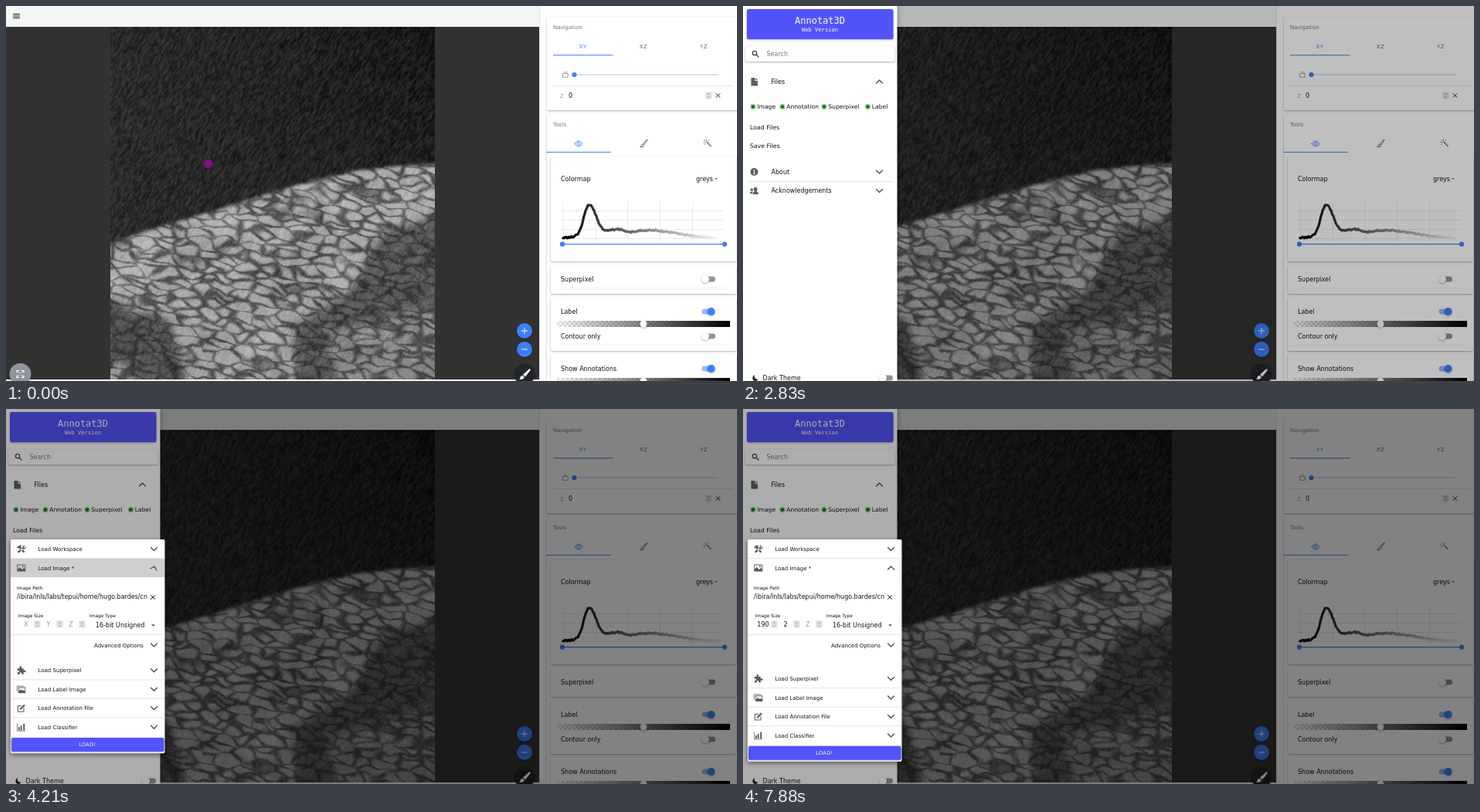
An HTML page with a canvas that plays this animation: 946x486 px, repeating every 8 s.

```html
<!DOCTYPE html>
<html lang="en">
<head>
<meta charset="utf-8">
<title>Annotat3D</title>
<style>
html, body { margin: 0; width: 100%; height: 100%; overflow: hidden; background: #323231; }
canvas { position: absolute; left: 135px; top: 27px; }
svg { position: absolute; left: 0; top: 0; }
text { font-family: 'DejaVu Sans', sans-serif; white-space: pre; }
.mono { font-family: 'DejaVu Sans Mono', monospace; }
.shadow { filter: drop-shadow(0 1px 1.2px rgba(0,0,0,.32)); }
.line { fill: none; stroke: currentColor; stroke-linecap: round; stroke-linejoin: round; }
</style>
</head>
<body>
<canvas id="scan" width="420" height="458"></canvas>
<svg id="ui" width="946" height="486" viewBox="0 0 946 486"></svg>
<script>
const $ = id => document.getElementById(id);
const BLUE = '#3d7ff8', INDIGO = '#5254fa';

// ---- seeded randomness
const hash = (x, y) => {
  let h = Math.imul(x, 374761393) + Math.imul(y, 668265263) | 0;
  h = Math.imul(h ^ h >>> 13, 1274126177);
  return ((h ^ h >>> 16) >>> 0) / 2 ** 32;
};
const mix = (a, b, k) => a + (b - a) * k;
const clamp = v => Math.min(1, Math.max(0, v));

// ---- drawing helpers
const text = (x, y, s, size = 8, fill = '#111', more = '') =>
  `<text x="${x}" y="${y + size * .36}" font-size="${size}" fill="${fill}" ${more}>${s}</text>`;
const mid = 'text-anchor="middle"';
const rect = (x, y, w, h, fill, more = '') =>
  `<rect x="${x}" y="${y}" width="${w}" height="${h}" fill="${fill}" ${more}/>`;
const dot = (x, y, r, fill, more = '') => `<circle cx="${x}" cy="${y}" r="${r}" fill="${fill}" ${more}/>`;
const rule = (x, y, w, c = '#dedede') => rect(x, y, w, .8, c);
const path = (x, y, d, color = '#222', width = 1) =>
  `<path class="line" transform="translate(${x} ${y})" d="${d}" color="${color}" stroke-width="${width}"/>`;
const solid = (x, y, d, color = '#55595f') => `<path transform="translate(${x} ${y})" d="${d}" fill="${color}" fill-rule="evenodd"/>`;
const card = (x, y, w, h) => rect(x, y, w, h, '#fff', 'rx="2" class="shadow"');
const chevron = (x, y, id = '') => `<g transform="translate(${x} ${y})"><path ${id && `id="${id}"`} class="line"
  d="M-4-2L0 2L4-2" color="#444" stroke-width="1.2"/></g>`;
const cross = (x, y) => path(x, y, 'M-2.5-2.5L2.5 2.5M2.5-2.5L-2.5 2.5', '#222', 1);
const spinner = (x, y) => rect(x - 4, y - 4.5, 8.5, 9, '#e4e4e4', 'rx="1"') +
  path(x, y, 'M-1.5-1.3L.2-2.8L1.9-1.3M-1.5 1.3L.2 2.8L1.9 1.3', '#777', .7);
const toggle = (x, y, on) => on
  ? rect(x - 12, y - 3.5, 16, 7, '#94b9fb', 'rx="3.5"') + dot(x, y, 5, BLUE, 'class="shadow"')
  : rect(x - 3, y - 3.5, 16, 7, '#949494', 'rx="3.5"') + dot(x, y, 5, '#fff', 'class="shadow"');
const fab = (x, y, r, fill) => dot(x, y, r, fill, 'class="shadow"');
const alphaBar = y => rect(713, y - 4, 224, 8, 'url(#checker)') + rect(713, y - 4, 224, 8, 'url(#fade)') +
  dot(825, y, 4.5, '#fff', 'class="shadow"');

// ---- icons of the menu and the dialog
const icons = {
  doc: 'M-4-5H1V-1H4.500V5.500H-4ZM2-5L4.500-2H2Z',
  info: 'M-5 0A5 5 0 1 1 5 0A5 5 0 1 1-5 0ZM-.7-3H.7V-1.600H-.7ZM-1-.7H.7V2.400H1.200V3.200H-1.200V2.400H-.6V0H-1Z',
  people: 'M-.5-2A2.300 2.300 0 1 1 4-2A2.300 2.300 0 1 1-.5-2ZM-2 4.500Q-2 .8 1.800 .8T5.500 4.500ZM-5-1.500A1.800 1.800 0 1 1-1.400-1.500A1.800 1.800 0 1 1-5-1.500ZM-5.500 3.800Q-5.500 .9-3 .9L-1.500 1.300Q-2.700 2.300-2.800 3.800Z',
  tools: 'M-5.500-2L-2.500-5L1-4.500L-1-3.500L0-2L4.500 3.500L3 5L-2.500-.5L-3.500-1.500L-4.300-.8ZM5-5L3-3V-2L4-1.500L5.800-3.500Q6 0 3 0L-3.500 5L-5 3.500L1.500-2Q1.500-5 5-5Z',
  image: 'M-5.500-4.500H5.500V4.500H-5.500ZM-4.500-3.500V1.500L-2-1L1 2L3 0L4.500 1.500V-3.500ZM1.200-1.800A1 1 0 1 1 3.200-1.800A1 1 0 1 1 1.200-1.800Z',
  puzzle: 'M-5-2.500H-2Q-3-5.500-1-5.500T0-2.500H3V.2Q5.800-.8 5.800 1.200T3 2V5H.5Q1 2.500-.8 2.500T-2 5H-5V2.500Q-2.500 3-2.500 1.200T-5 .2Z',
  images: 'M-5.500-4.500H3.500V-3.700H-4.700V2.500H-5.500ZM-3.700-2.700H5.500V5H-3.700ZM-2.800-1.800V2L-.5 0L1.500 2L3 1L4.600 2.500V-1.800Z',
  edit: 'M-5-3.500H1L0-2.500H-4V4H2.700V0L3.700-1V5H-5ZM3.500-5L5-3.500L0 1.800L-2 2.300L-1.500 .3Z',
  chart: 'M-5.500-4.500H-4.700V4.500H5.500V5.300H-5.500ZM-3.700 0H-1.900V4H-3.700ZM-1-2H.8V4H-1ZM2.500-4.500H4.500V4H2.500Z'
};

// ---- histogram: a few knots, sampled with a little jitter
const knots = [[721, 300.5], [735, 299], [740, 296], [745, 285], [750, 265], [753, 258.5], [758, 258.5], [763, 270],
  [768, 284], [773, 290], [779, 291], [792, 289], [808, 293], [820, 291], [840, 290.5], [850, 292], [870, 295],
  [890, 298], [910, 300], [929, 301]];
const curveAt = x => {
  const i = Math.max(1, knots.findIndex(k => k[0] >= x)), [a, b] = [knots[i - 1], knots[i]];
  return mix(a[1], b[1], (x - a[0]) / (b[0] - a[0]));
};
const curve = Array.from({ length: 209 }, (_, i) =>
  `${721 + i},${curveAt(721 + i) + (hash(i, 7) - .5) * 2}`).join(' ');

// ---- viewer and right panel
const base = `
<defs>
  <pattern id="checker" width="6" height="6" x="713" y="2" patternUnits="userSpaceOnUse">
    ${rect(0, 0, 6, 6, '#fff') + rect(0, 0, 3, 3, '#ddd') + rect(3, 3, 3, 3, '#ddd')}</pattern>
  <linearGradient id="fade"><stop stop-opacity="0"/><stop offset="1"/></linearGradient>
  <linearGradient id="greys" gradientUnits="userSpaceOnUse" x1="721" x2="929">
    <stop/><stop offset="1" stop-color="#fff"/></linearGradient>
  <clipPath id="filesClip"><rect id="filesBox" x="0" y="110" width="200"/></clipPath>
  <clipPath id="formClip"><rect id="formBox" x="6" y="218" width="200"/></clipPath>
  <clipPath id="pathClip">${rect(13, 236, 170, 16, '#000')}</clipPath>
</defs>
${dot(0, 0, 5.5, '#860b86', 'id="cursor"')}
${rect(0, 484, 690, 2, '#f4f5f5')}
${rect(0, 0, 690, 27, '#f4f5f5')}
${dot(13.5, 13, 8.5, '#000', 'id="hover" opacity="0"')}
${path(13.5, 13, 'M-4-2.500H4M-4 0H4M-4 2.500H4', '#111', 1.1)}
${fab(18.5, 477, 14, '#92949c')}
${path(18.5, 477, 'M-4.500-2V-4.500H-2M-4.500-4.500L-1.500-1.500M4.500-2V-4.500H2M4.500-4.500L1.500-1.500M-4.500 2V4.500H-2M-4.500 4.500L-1.500 1.500M4.500 2V4.500H2M4.500 4.500L1.500 1.500', '#fff')}
${fab(671, 421, 10, BLUE) + path(671, 421, 'M-3.500 0H3.500M0-3.500V3.500', '#fff')}
${fab(671, 445, 10, BLUE) + path(671, 445, 'M-3.500 0H3.500', '#fff')}
${fab(671, 477, 13.5, '#222428')}
${solid(671, 477, 'M6.500-7L8-5.500L1 3.500L-2 .8ZM-2.700 1.800L0 4.300Q-1.500 8-7 6.500Q-5.500 5.500-5.300 4Q-5 2-2.700 1.800Z', '#fff')}
${rect(690, 0, 256, 486, '#fefefe') + rect(690, 0, .8, 486, '#ddd')}
${card(700, 13.5, 250, 121.5) + text(708, 27, 'Navigation', 7, '#777')}
${[['XY', 746.5, BLUE], ['XZ', 825, '#666'], ['YZ', 903, '#666']].map(([s, x, c]) =>
    text(x, 52.5, s, 7, c, mid + ' letter-spacing=".4"')).join('')}
${rect(708, 63.2, 77.5, 1, BLUE)}
${path(724, 89, 'M-3.200-1.500H3.200V3.300H-3.200ZM-2-3.200H2', '#777', .7)}
${rect(735, 88.5, 187, 1, '#a9c7fb') + dot(735.5, 89, 3.1, BLUE)}
${rule(708, 103, 233) + text(717, 116, 'Z', 7, '#999') + text(728, 116, '0')}
${spinner(909, 116) + cross(921.5, 116)}
${card(700, 139.5, 250, 360) + text(708, 153, 'Tools', 7, '#777')}
${path(741, 178.5, 'M-5 0Q-2.500-3.700 0-3.700T5 0Q2.500 3.700 0 3.700T-5 0ZM-1.900 0A1.900 1.900 0 1 1 1.900 0A1.900 1.900 0 1 1-1.900 0', BLUE, .9)}
${path(825, 178, 'M4.300-4.700L-1 .7L.5 2.200L4.900-4.100ZM-1.400 1.400Q-2.700 1.600-2.900 3.300Q-3.200 4.400-4.500 4.400Q-1.800 5.400-.2 4.300Q.8 3.500 .2 2.700', '#444', .8)}
${path(908, 178, 'M-1.500-1.500L4 4L4.700 3.300L-.8-2.200ZM-1.500-5V-4M-5-1.500H-4M-4.300-4.300L-3.500-3.500M1.500-4.300L1-3.700M-4.300 1.300L-3.500 .7', '#444', .8)}
${rect(699, 188.9, 84, 1, BLUE)}
${card(705, 195, 240, 136) + text(718, 224, 'Colormap') + text(893, 224, 'greys')}
${solid(919, 224, 'M-2-1H2L0 1Z', '#666')}
${[265, 277, 289, 301].map(y => rect(718, y, 211, .6, '#ddd')).join('')}
${[721, 763, 804, 846, 888].map(x => rect(x, 254, .6, 50, '#ddd')).join('')}
<polyline points="${curve}" fill="none" stroke="url(#greys)" stroke-width="3.200" stroke-linejoin="round" stroke-linecap="round"/>
${rect(720, 308, 210, 1.2, BLUE) + dot(720, 308.7, 3.1, BLUE) + dot(930, 308.7, 3.1, BLUE)}
${card(705, 336, 240, 37) + text(718, 354, 'Superpixel') + toggle(905, 354) + rule(718, 365, 214, '#eee')}
${card(705, 378, 240, 69) + text(718, 396, 'Label') + toggle(912.5, 396, 1) + alphaBar(412)}
${text(718, 428, 'Contour only') + toggle(905, 428) + rule(718, 439, 214, '#eee')}
${card(705, 452, 240, 60) + text(718, 470, 'Show Annotations') + toggle(912.5, 470, 1) + alphaBar(486)}
${rect(0, 0, 946, 486, '#000', 'id="menuShade"')}`;

// ---- side menu
const menuItem = (y, icon, label, id) =>
  solid(14.5, y, icons[icon], '#565e6a') + text(36.5, y, label) + chevron(176.5, y, id);

const menu = `<g id="menu">
${rect(0, 0, 199.5, 486, '#fff', 'style="filter:drop-shadow(1px 0 3px rgba(0,0,0,.3))"')}
${rect(5, 4, 189.5, 39, INDIGO, 'rx="2.5" class="shadow"')}
${text(99.5, 18.5, 'Annotat3D', 12, '#fff', mid + ' class="mono"')}
${text(99.5, 30.5, 'Web Version', 7.1, '#fff', mid + ' class="mono"')}
${rect(3, 51.5, 193.5, 20.5, '#fff', 'rx="1.5" class="shadow"')}
${path(16, 62, 'M-3.700-1A2.700 2.700 0 1 1 1.700-1A2.700 2.700 0 1 1-3.700-1M1 1L4 4', '#444', 1.3) + text(30.5, 62, 'Search', 8, '#777')}
${rect(4, 86, 192, 24, '#000', 'id="filesHover"') + menuItem(98, 'doc', 'Files', 'filesChevron')}
<g clip-path="url(#filesClip)">
${rect(33, 145.5, 142.5, 24, '#000', 'id="ripple" rx="4"')}
${[['Image', 13], ['Annotation', 51], ['Superpixel', 105], ['Label', 161.5]].map(([s, x]) =>
    dot(x, 130.5, 3.7, '#a5cfa5') + dot(x, 130.5, 2.3, '#087a16') + text(x + 5.3, 130.5, s, 7.6)).join('')}
${text(9, 157, 'Load Files', 7.8) + text(9, 181.5, 'Save Files', 7.8)}
</g>
<g id="lowerItems">${menuItem(122, 'info', 'About') + rule(7, 134, 188) + menuItem(146.5, 'people', 'Acknowledgements')}</g>
${solid(16, 482, 'M-1-4Q-2.500 1.500 3.700 1.700Q2 4.300-.5 4Q-3.500 3.500-3.700 0Q-3.500-3-1-4Z', '#222')}
${text(25.5, 482, 'Dark Theme') + toggle(181, 482)}
</g>
${rect(0, 0, 946, 486, '#000', 'id="dialogShade"')}`;

// ---- load dialog
const row = (y, icon, label, id) =>
  solid(19.8, y, icons[icon]) + text(41.5, y, label, 7) + chevron(191.5, y, id);
const field = (x, id) => text(x, 279, '', 8, '#111', `id="${id}" ${mid}`) + spinner(x + 14.3, 279);

const dialog = `<g id="dialog">
${rect(6, 169, 199.5, 169, '#fff', 'id="sheet" rx="2" style="filter:drop-shadow(0 2px 3px rgba(0,0,0,.5))"')}
${row(181.5, 'tools', 'Load Workspace') + rule(6, 193.3, 199.5)}
${rect(6, 194, 199.5, 24, '#000', 'id="imageHover"') + row(206, 'image', 'Load Image *', 'imageChevron')}
<g clip-path="url(#formClip)">
${rect(6, 265, 199.5, 28, '#000', 'id="sizeHover"')}
${text(14, 232, 'Image Path', 5.9)}
<g clip-path="url(#pathClip)">${text(14, 243.5, '/ibira/lnls/labs/tepui/home/hugo.bardes/cn')}</g>
${cross(190, 244)}
${text(16, 267.5, 'Image Size', 5.9) + text(108, 267.5, 'Image Type', 5.9)}
${field(26, 'sizeX') + field(55, 'sizeY') + field(84, 'sizeZ')}
${rect(0, 274, .7, 9.5, '#222', 'id="caret"')}
${text(116, 280, '16-bit Unsigned') + solid(190.5, 280.5, 'M-2.500-1.200H2.500L0 1.300Z', '#555')}
${rule(6, 292.3, 199.5) + text(114, 306, 'Advanced Options', 7) + chevron(191.5, 306)}
</g>
<g id="lowerRows">
${[['puzzle', 'Load Superpixel'], ['images', 'Load Label Image'], ['edit', 'Load Annotation File'], ['chart', 'Load Classifier']]
    .map(([icon, s], i) => row(230.5 + i * 24.5, icon, s) + (i < 3 ? rule(6, 242.3 + i * 24.5, 199.5) : '')).join('')}
${rect(7, 317.8, 197.5, 18, INDIGO, 'rx="2" class="shadow"')}
${text(105.4, 326.6, 'LOAD!', 6.5, '#fff', mid + ' letter-spacing=".4"')}
</g></g>`;

$('ui').innerHTML = base + menu + dialog;

// ---- tomography slice
const noise = (x, y) => {
  const i = Math.floor(x), j = Math.floor(y), u = x - i, v = y - j;
  return mix(mix(hash(i, j), hash(i + 1, j), u), mix(hash(i, j + 1), hash(i + 1, j + 1), u), v) - .5;
};
// gap between the two nearest seeds: zero on cell walls
const cellGap = (x, y) => {
  const i = Math.floor(x), j = Math.floor(y);
  let near = 9, next = 9;
  for (let a = i - 1; a < i + 2; a++) for (let b = j - 1; b < j + 2; b++) {
    const d = Math.hypot(a + hash(a, b) - x, b + hash(a + 99, b) - y);
    if (d < near) { next = near; near = d; } else if (d < next) next = d;
  }
  return next - near;
};

function drawScan() {
  const W = 420, H = 458, c = $('scan').getContext('2d', { willReadFrequently: true });
  const region = (tone, blur, points) => {
    c.filter = `blur(${blur}px)`;
    c.fillStyle = `rgb(${tone},${tone},${tone})`;
    c.fill(new Path2D(`M${points}Z`));
  };
  c.fillRect(0, 0, W, H);
  c.translate(-135, -27);
  region(255, 2, '110,315 135,307 200,286 270,265 330,246 400,225 450,214 500,208 580,204 580,510 110,510');
  region(90, 5, '110,372 150,385 165,398 195,397 212,410 222,440 240,510 180,510 150,462 110,468');
  region(105, 5, '580,264 515,285 487,297 468,325 455,355 435,378 400,398 375,415 372,450 378,510 450,510 412,425 470,420 580,388');
  region(205, 8, '412,425 470,414 580,380 580,510 450,510');
  const img = c.getImageData(0, 0, W, H), p = img.data;
  for (let y = 0; y < H; y++) for (let x = 0; x < W; x++) {
    const k = (y * W + x) * 4, m = p[k] / 255;
    const grain = noise((x + y * .5) / 2, y / 4.5), fine = noise(x / 1.4, y / 1.4);
    let v = 43 - 20 * x / W * (1 - y / H) + grain * 34 + fine * 14;
    if (m > .01) {
      const wx = x + noise(x / 17, y / 13) * 14, wy = y + noise(x / 15 + 50, y / 12) * 10;
      // walls vary in depth, so that some cells merge
      const gap = cellGap(wx / 27, (wy - .2 * x) / 11.5);
      const wall = clamp(gap * 1.9 + noise(x / 13, y / 8 + 40) * .8 + .12);
      const soft = wall * wall * (3 - 2 * wall);
      const tone = (188 - 28 * y / H) * (.48 + .52 * soft) + noise(x / 30, y / 20) * 30 + grain * 24 + fine * 20;
      v = mix(v, tone, m);
    }
    p[k] = p[k + 1] = p[k + 2] = v;
  }
  c.putImageData(img, 0, 0);
}
drawScan();

// ---- timeline
const span = (t, from, to) => clamp((t - from) / (to - from));
const bezier = (x1, y1, x2, y2) => x => {
  if (x <= 0 || x >= 1) return x;
  const at = (a, b, s) => 3 * a * s * (1 - s) ** 2 + 3 * b * s * s * (1 - s) + s ** 3;
  let lo = 0, hi = 1;
  for (let i = 0; i < 24; i++) {
    const s = (lo + hi) / 2;
    if (at(x1, x2, s) < x) lo = s; else hi = s;
  }
  return at(y1, y2, lo);
};
const slide = bezier(0, 0, .2, 1), pop = bezier(.36, .66, .04, 1), unfold = bezier(.25, .8, .5, 1);
const pulse = (t, a, b, c, d) => span(t, a, b) * (1 - span(t, c, d));
const set = (id, name, value) => $(id).setAttribute(name, value);
const fieldText = (id, value, hint) => {
  $(id).textContent = value || hint;
  set(id, 'fill', value ? '#111' : '#999');
};

function draw(t) {
  const move = span(t, 330, 860);
  set('cursor', 'transform', `translate(${mix(262, 13, move)} ${mix(204.5, 13, move)})`);
  set('hover', 'opacity', .04 * span(t, 840, 1040));

  const open = slide(span(t, 1458, 1790));
  set('menu', 'transform', `translate(${-212 * (1 - open)} 0)`);
  set('menuShade', 'opacity', .25 * open);

  const files = unfold(span(t, 2265, 2565)), drop = 93 * files;
  set('filesHover', 'opacity', .045 * pulse(t, 1740, 1800, 2650, 2820) + .1 * pulse(t, 2265, 2340, 2400, 2700));
  set('filesChevron', 'transform', `rotate(${-180 * files})`);
  set('filesBox', 'height', drop);
  set('lowerItems', 'transform', `translate(0 ${drop})`);
  set('ripple', 'opacity', .17 * pulse(t, 3110, 3165, 3200, 3440));

  const show = pop(span(t, 3104, 3404));
  set('dialogShade', 'opacity', .32 * show);
  set('dialog', 'opacity', pop(span(t, 3104, 3254)));
  set('dialog', 'transform', `translate(6 169) scale(${.8 + .2 * show}) translate(-6 -169)`);

  const form = unfold(span(t, 4044, 4344)), grow = 119 * form;
  set('imageHover', 'opacity', .19 * pulse(t, 4044, 4130, 4230, 4540));
  set('imageChevron', 'transform', `rotate(${-180 * form})`);
  set('sheet', 'height', 169 + grow);
  set('formBox', 'height', grow);
  set('lowerRows', 'transform', `translate(0 ${grow})`);

  set('sizeHover', 'opacity', .04 * pulse(t, 4870, 5040, 5660, 5790));
  fieldText('sizeX', '190'.slice(0, (t >= 5670) + (t >= 6500) + (t >= 6580)), 'X');
  fieldText('sizeY', t >= 7880 ? '2' : '', 'Y');
  fieldText('sizeZ', '', 'Z');
  const inX = t >= 6580 && t < 7290, inY = t >= 7580 && t < 7880;
  set('caret', 'x', inX ? 33.4 : 55);
  set('caret', 'opacity', +(inX || inY));
}

function tick() {
  draw(performance.now() % 8000);
  requestAnimationFrame(tick);
}
tick();
</script>
</body>
</html>
```
